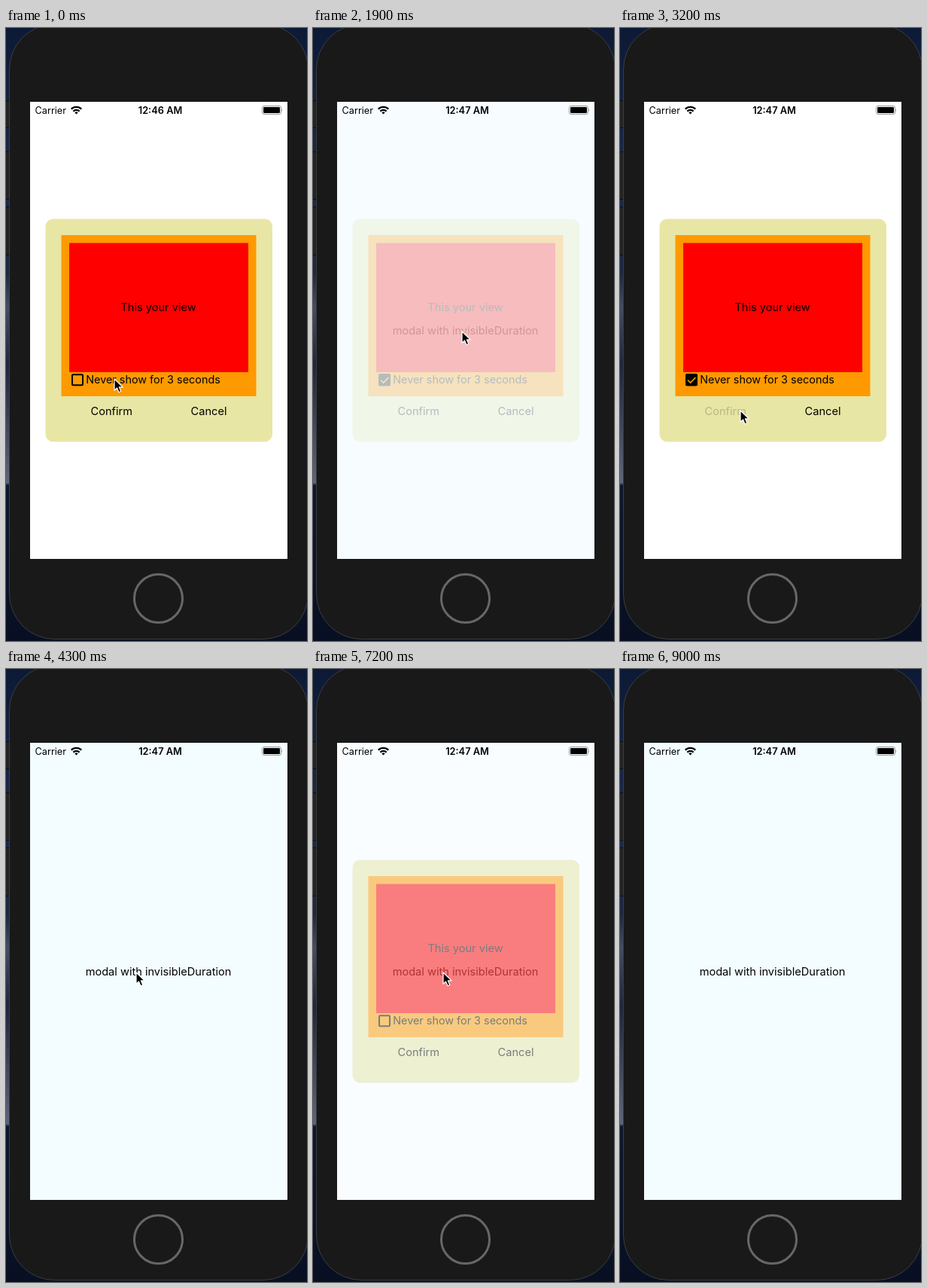
An HTML page that plays this animation: 400 px wide and 814 px high, repeating every 9700 ms.

```html
<!DOCTYPE html>
<html lang="en">
<head>
<meta charset="utf-8">
<title>Modal demo</title>
<style>
  html, body { margin: 0; width: 100%; height: 100%; overflow: hidden; background: #0b142b; }
  svg { display: block; width: 400px; height: 814px; }
  text { font: 14.6px Inter, Roboto, sans-serif; text-anchor: middle; }
  .status { font-size: 12.7px; }
  .clock { font-size: 12.8px; font-weight: 600; }
  .label { font-size: 14.4px; }
</style>
</head>
<body>
<svg viewBox="0 0 400 814">
  <defs>
    <linearGradient id="desk" x1="0" y1="0" x2="0" y2="1">
      <stop offset="0" stop-color="#0d1a36"/>
      <stop offset=".25" stop-color="#1a2a4a"/>
      <stop offset=".4" stop-color="#1c2740"/>
      <stop offset=".455" stop-color="#444d63"/>
      <stop offset=".55" stop-color="#20263a"/>
      <stop offset=".742" stop-color="#5f6679"/>
      <stop offset=".746" stop-color="#0c1730"/>
      <stop offset="1" stop-color="#080f22"/>
    </linearGradient>
  </defs>

  <rect width="400" height="814" fill="url(#desk)"/>
  <g fill="#232323" stroke="#0b0b0b">
    <rect x="-2" y="96.5" width="8" height="36"/>
    <rect x="-2" y="164.5" width="8" height="63"/>
    <rect x="-2" y="237.5" width="8" height="64"/>
  </g>
  <rect x="4.5" y="-5" width="397" height="816.5" rx="60" fill="#191919" stroke="#3b3d42"/>
  <circle cx="202.5" cy="757.5" r="32" fill="none" stroke="#676767" stroke-width="3"/>

  <rect x="32" y="98" width="342" height="607" fill="#f3fcff"/>
  <text id="opener" x="202.5" y="407">modal with invisibleDuration</text>

  <g id="modal">
    <rect x="32" y="98" width="342" height="607" fill="#fff"/>
    <rect x="52.5" y="253.5" width="301.5" height="296" rx="10" fill="#e8e6a5"/>
    <rect x="73.5" y="275" width="259" height="214" fill="#f90"/>
    <rect x="84" y="285.5" width="238" height="171.5" fill="#f00"/>
    <text x="202.5" y="376">This your view</text>
    <g id="option">
      <rect x="88" y="460.3" width="14" height="14" rx="1" fill="none" stroke="#000" stroke-width="2"/>
      <g id="tick">
        <rect x="87" y="459.3" width="16" height="16" rx="2"/>
        <path d="M90 467.5l3.6 3.6 6.8-7" fill="none" stroke="#f90" stroke-width="1.7"/>
      </g>
      <text class="label" x="195.5" y="472">Never show for 3 seconds</text>
    </g>
    <text id="confirm" x="140.3" y="514">Confirm</text>
    <text id="cancel" x="269.5" y="514">Cancel</text>
  </g>

  <text class="status" x="59.3" y="113.7">Carrier</text>
  <g fill="none" stroke="#000" stroke-width="2.3">
    <path d="M86.8 107.6a9.4 9.4 0 0 1 13.4 0M89.4 110.6a5.8 5.8 0 0 1 8.2 0"/>
    <path d="M93.5 114.6l-2.2-2.4a3.2 3.2 0 0 1 4.4 0z" fill="#000" stroke="none"/>
  </g>
  <text id="clock" class="clock" x="205" y="113.7">12:46 AM</text>
  <rect x="340.5" y="103.5" width="25" height="11" rx="2.5" fill="none" stroke="#999"/>
  <rect x="342" y="105" width="22" height="8" rx="1.2"/>
  <path d="M366.6 107.2q1.6 1.8 0 3.8z" fill="#777"/>

  <path id="cursor" d="M0 0V15.2L3.5 12 6 17.7 8.8 16.5 6.4 10.9H11.2Z" stroke="#fff" stroke-width="1.2" stroke-linejoin="round"/>
</svg>

<script>
  const LOOP = 9700, STEP = 100, GLIDE = 400;
  const $ = id => document.getElementById(id);

  const spots = {
    option: { x: 144, y: 466 },
    cancel: { x: 260, y: 506 },
    confirm: { x: 160, y: 508 },
    opener: { x: 173, y: 403 },
  };

  // Each tap is named after the part it hits and timed at its release.
  const tap = (part, time, x = spots[part].x) => ({ part, time, x, y: spots[part].y });
  const taps = [
    tap('option', 300), tap('cancel', 1500),
    tap('opener', 2000, 198), tap('option', 2670, 160), tap('confirm', 3300),
    tap('opener', 4100), tap('opener', 4800), tap('opener', 6000),
    tap('opener', 7100), tap('option', 7700, 173), tap('confirm', 8500),
  ];

  const ramp = (time, start, length) => Math.min(1, Math.max(0, (time - start) / length));
  const easeOut = p => 1 - (1 - p) ** 2;
  const mix = (a, b, p) => a + (b - a) * p;

  // An opener only shows the modal when an option tap follows it.
  const visits = taps.flatMap(({ part, time }, i) => part === 'option'
    ? [{ open: i ? taps[i - 1].time : -LOOP, tick: time, close: taps[i + 1].time + STEP }]
    : []);

  function touchOpacity(part, time) {
    const dim = taps.filter(tap => tap.part === part)
      .map(tap => ramp(time, tap.time - 200, 100) * (1 - ramp(time, tap.time, 200)));
    return 1 - 0.8 * Math.max(...dim);
  }

  function cursorAt(time) {
    return taps.reduce((from, to) => {
      const p = easeOut(ramp(time, to.time - STEP - GLIDE, GLIDE));
      return { x: mix(from.x, to.x, p), y: mix(from.y, to.y, p) };
    }, spots.option);
  }

  function draw(time) {
    const shown = visits.map(v => ramp(time, v.open, 200) * (1 - ramp(time, v.close, GLIDE)));
    $('modal').style.opacity = Math.max(...shown);
    $('tick').style.opacity = +visits.some(v => time >= v.tick && time < v.close + GLIDE);
    for (const part in spots) $(part).style.opacity = touchOpacity(part, time);

    const { x, y } = cursorAt(time);
    $('cursor').setAttribute('transform', `translate(${x} ${y})`);
    $('cursor').style.opacity = +(time < 9000);
    $('clock').textContent = time < 1800 ? '12:46 AM' : '12:47 AM';
  }

  const start = performance.now();
  function frame() {
    const time = (performance.now() - start) % LOOP;
    draw(Math.floor(time / STEP) * STEP);
    requestAnimationFrame(frame);
  }
  frame();
</script>
</body>
</html>
```
